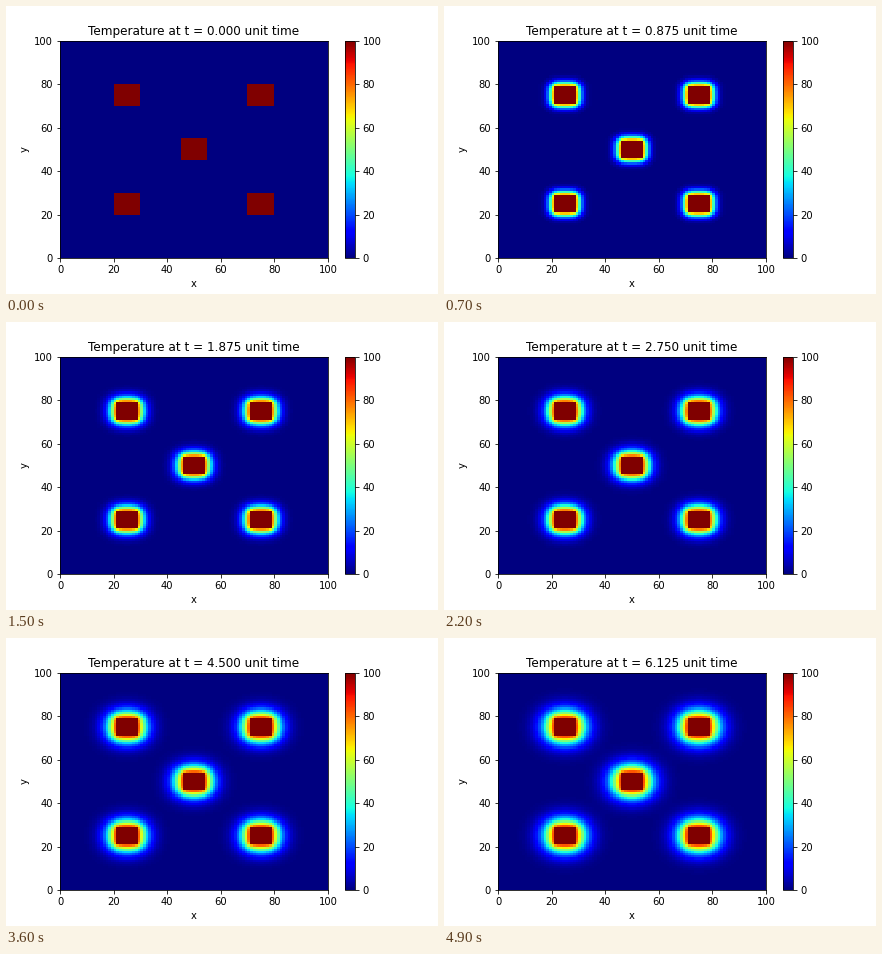
Animation of 432x288 px, one loop 5000 ms. Source, as a matplotlib script:

```python
import numpy as np
import matplotlib.pyplot as plt
from matplotlib.animation import FuncAnimation

plt.rcParams["font.family"] = "DejaVu Sans"
plt.rcParams["figure.subplot.bottom"] = 0.125

SIZE = 100
FRAMES = 50
ALPHA = 2.0
DT = 1 / (4 * ALPHA)
GAMMA = ALPHA * DT
HOT = 100.0
CORNERS = [(20, 20), (20, 70), (45, 45), (70, 20), (70, 70)]


def heat_squares(u, inset=0):
    """Set every 10-cell square, shrunk by inset on each side, to HOT."""
    for row, col in CORNERS:
        u[row + inset:row + 10 - inset, col + inset:col + 10 - inset] = HOT


def solve():
    """Explicit heat equation with cold edges and constantly hot cores."""
    u = np.zeros((FRAMES, SIZE, SIZE))
    heat_squares(u[0])
    for k in range(FRAMES - 1):
        now = u[k]
        mid = now[1:-1, 1:-1]
        neighbours = now[2:, 1:-1] + now[:-2, 1:-1] + now[1:-1, 2:] + now[1:-1, :-2]
        u[k + 1, 1:-1, 1:-1] = mid + GAMMA * (neighbours - 4 * mid)
        heat_squares(u[k + 1], inset=1)
    return u


temperature = solve()

fig, ax = plt.subplots(figsize=(6, 4), dpi=72)
mesh = ax.pcolormesh(temperature[0], cmap="jet", vmin=0, vmax=HOT)
fig.colorbar(mesh, ax=ax)
ax.set_xlabel("x")
ax.set_ylabel("y")
title = ax.set_title("")


def update(k):
    mesh.set_array(temperature[k])
    title.set_text(f"Temperature at t = {k * DT:.3f} unit time")
    return mesh, title


anim = FuncAnimation(fig, update, frames=FRAMES, interval=100, repeat=True)
plt.show()
```
